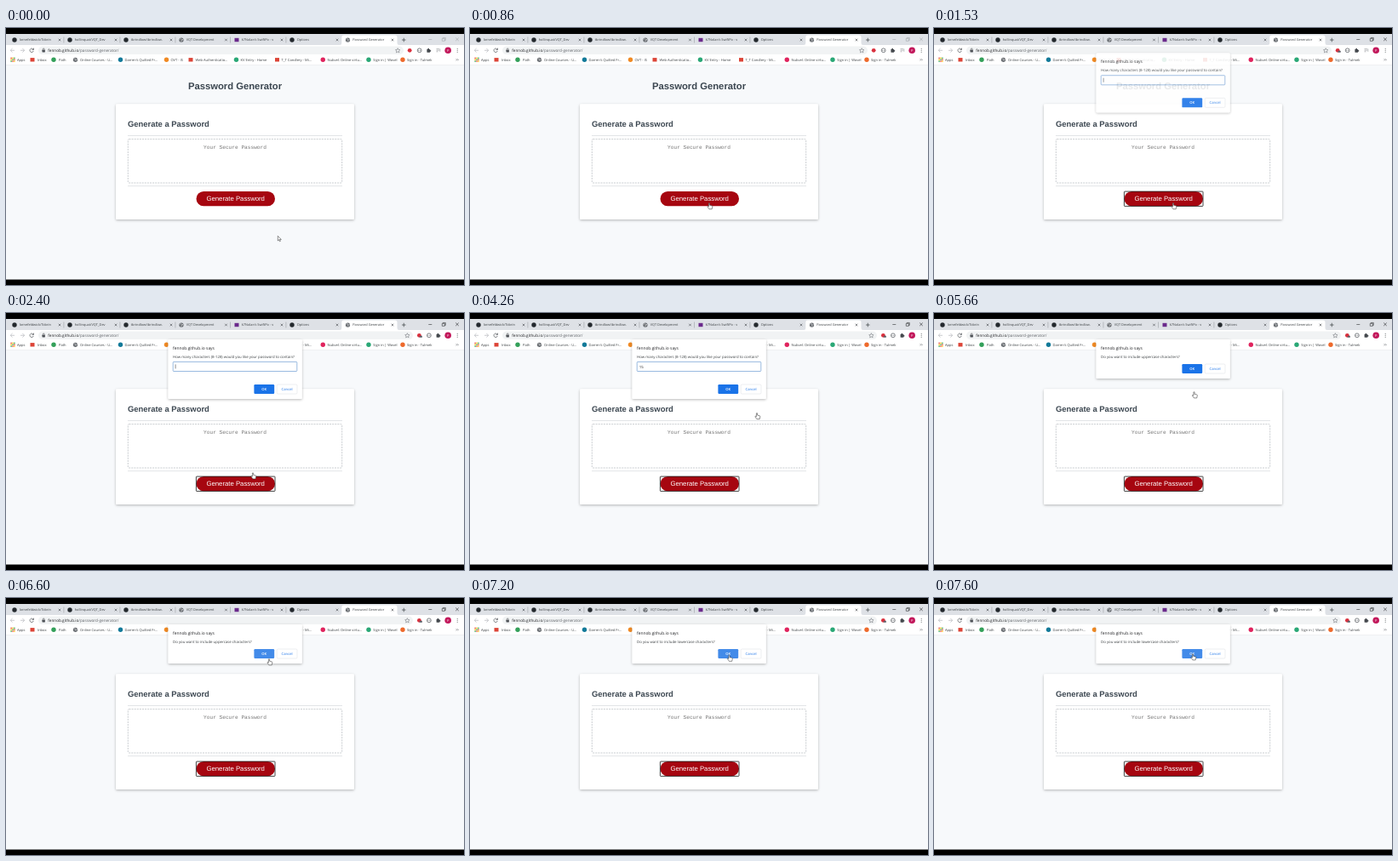
Animation of 538x302 px, one loop 8000 ms. Source, as an HTML page:

```html
<!DOCTYPE html>
<html lang="en">
<head>
<meta charset="utf-8">
<title>Password Generator</title>
<style>
html, body { margin: 0; width: 100%; height: 100%; overflow: hidden; background: #000; }
svg { display: block; width: 538px; height: 302px; }
text { font-family: "Open Sans", "Noto Sans", sans-serif; text-rendering: geometricPrecision; white-space: pre; }
.page { font-family: "Liberation Sans", Arial, sans-serif; }
.mono { font-family: "Liberation Mono", monospace; }
</style>
</head>
<body>
<svg id="stage" viewBox="0 0 538 302" xmlns="http://www.w3.org/2000/svg">
  <defs>
    <filter id="soft" x="-10%" y="-20%" width="120%" height="150%">
      <feDropShadow dx="0" dy="1" stdDeviation="1.5" flood-color="#000" flood-opacity=".28"/>
    </filter>
  </defs>
</svg>
<script>
const LOOP = 8000;
const stage = document.getElementById('stage');

function el(parent, tag, attrs, content) {
  const node = document.createElementNS('http://www.w3.org/2000/svg', tag);
  for (const key in attrs) node.setAttribute(key, attrs[key]);
  if (content !== undefined) node.textContent = content;
  parent.appendChild(node);
  return node;
}
const group = (p = stage) => el(p, 'g', {});
const rect = (p, x, y, width, height, fill, more) => el(p, 'rect', { x, y, width, height, fill, ...more });
const dot = (p, cx, cy, r, fill, more) => el(p, 'circle', { cx, cy, r, fill, ...more });
const line = (p, d, stroke, width = 0.6, more) =>
  el(p, 'path', { d, stroke, 'stroke-width': width, fill: 'none', ...more });
const text = (p, x, cy, size, str, fill, more) =>
  el(p, 'text', { x, y: cy + size * 0.35, 'font-size': size, fill, ...more }, str);
const cross = (p, x, y, r, color, w) =>
  line(p, `M${x - r} ${y - r}l${2 * r} ${2 * r}m0 ${-2 * r}l${-2 * r} ${2 * r}`, color, w);
const move = (node, x, y) => node.setAttribute('transform', `translate(${x} ${y})`);
const show = (node, on) => node.setAttribute('visibility', on ? 'inherit' : 'hidden');

function globe(p, x, y) {
  dot(p, x, y, 2.6, '#5f6368');
  line(p, `M${x - 1.8} ${y - 0.6}q1.6 -1.6 2.4 .2t1.2 -.8M${x - 1} ${y + 1.4}l1.2 -.8l.8 .8`, '#fff', 0.6);
}
function icon(p, kind, x, y) {
  if (kind === 'globe') return globe(p, x, y);
  if (kind === 'apps') {
    const hues = ['#ea4335', '#fbbc04', '#34a853'];
    for (let i = 0; i < 9; i++)
      rect(p, x - 2.6 + (i % 3) * 1.9, y - 2.6 + Math.floor(i / 3) * 1.9, 1.4, 1.4, hues[(i + Math.floor(i / 3)) % 3]);
    return;
  }
  if (kind[0] === '=') return rect(p, x - 2.5, y - 2.2, 5, 4.4, kind.slice(1));
  dot(p, x, y, 2.7, kind);
}

// Window
rect(stage, 0, 7, 538, 13, '#dee1e6');
rect(stage, 0, 20, 538, 24, '#fff');
rect(stage, 0, 43.2, 538, 0.6, '#dfe2e6');
rect(stage, 0, 43.8, 538, 252, '#f7f9fb');

// Tabs
el(stage, 'path', { d: 'M392 20q2.3 0 2.3 -2.5V11q0 -2.5 2.5 -2.5H457q2.5 0 2.5 2.5V17.5q0 2.5 2.3 2.5z', fill: '#fff' });
const tabs = [
  [10, '#24292e', 'lornefeldwick/Tobrin', 63],
  [75, '#24292e', 'hollinquat/VQT_Dev', 129],
  [141, '#24292e', 'tbrindlow/tbrindlow.', 194],
  [206, 'globe', 'VQT Development', 258.5],
  [271, '=#6b2a8c', "k7Nolan's SwiftPo - v", 324],
  [336, '#24292e', 'Options', 389],
  [401.5, 'globe', 'Password Generator', 454]
];
tabs.forEach(([x, kind, label, close], i) => {
  icon(stage, kind, x, 14);
  text(stage, x + 5.7, 14, 3.9, label, '#3c4043');
  cross(stage, close, 14, 1.3, '#45494d', 0.6);
  if (i < 5) rect(stage, close + 4.7, 10.5, 0.5, 7, '#8f9398');
});
line(stage, 'M465 14h4.6M467.3 11.7v4.6', '#3c4043', 0.7);
const controls = group();
line(controls, 'M496.3 13.5h4M512.3 12.3h3v3h-3zM513.3 12.3v-.9h3v3h-1', 'currentColor', 0.55);
cross(controls, 530, 13.3, 1.8, 'currentColor', 0.6);

// Address bar
line(stage, 'M10 26.3H5.4M7.5 24l-2.3 2.3l2.3 2.3M17 26.3h4.6M19.4 24l2.3 2.3l-2.3 2.3', '#b4b7bb', 0.7);
line(stage, 'M32.1 25.2a2.2 2.2 0 1 0 .2 1.8M32.5 23.6v2h-2', '#505458', 0.7);
const pill = rect(stage, 38, 21.5, 429, 9.6, '#f1f3f4', { rx: 4.8 });
rect(stage, 42.5, 25.8, 3.4, 2.7, '#4d5156', { rx: 0.4 });
line(stage, 'M43.2 26v-1a1 1 0 0 1 2 0v1', '#4d5156', 0.6);
text(stage, 49.3, 26.4, 4.66, 'fennob.github.io', '#202124').append(
  Object.assign(el(document.createElementNS('http://www.w3.org/2000/svg', 'g'), 'tspan', { fill: '#5f6368' }, '/password-generator/')));

// Toolbar icons, shifting right once the list icon is gone
const tools = group();
line(tools, 'M460.2 23.7l.8 1.8l1.9 .2l-1.4 1.3l.4 1.9l-1.7 -1l-1.7 1l.4 -1.9l-1.4 -1.3l1.9 -.2z', '#5f6368', 0.5);
dot(tools, 474.2, 26.3, 2.4, '#d9303e');
const badge = rect(tools, 474.7, 26.8, 3, 2, '#5b6068', { rx: 0.4 });
dot(tools, 485.7, 26.3, 2.4, 'none', { stroke: '#4d5156', 'stroke-width': 0.7 });
for (const x of [484.7, 486.7]) dot(tools, x, 26.3, 0.5, '#4d5156');
rect(tools, 494.4, 25, 3.8, 3.7, '#45494e', { rx: 0.4 });
dot(tools, 496.2, 24.7, 0.9, '#45494e');
dot(tools, 498.4, 26.8, 0.9, '#45494e');
const list = line(stage, 'M505.5 24.6h3.4M505.5 26.2h3.4M505.5 27.8h2M509.8 24.4v3.4', '#8b8f94', 0.6);
dot(stage, 519.2, 26.3, 3.8, '#c2185b');
text(stage, 519.2, 26.3, 3.8, 'P', '#fff', { 'text-anchor': 'middle' });
for (const y of [24.4, 26.3, 28.2]) dot(stage, 530.2, y, 0.5, '#4d5156');

// Bookmarks
[
  [8, 'apps', 13, 'Apps'],
  [31, '=#dc4437', 37, 'Inbox'],
  [56, '#34a05a', 62, 'Path'],
  [81.5, 'globe', 87, 'Online Courses - U...'],
  [134.5, '#137a99', 139.5, "Darren's Quilted Fr..."],
  [188.5, '#f08a24', 193.5, 'OVT - IS'],
  [217, '=#dc4437', 222.5, 'Web Authenticatio...'],
  [270.5, '#2aa876', 275.5, 'KV Entry - Home'],
  [318.5, '=#dc4437', 323.5, 'T_T Candlery - Mi...'],
  [372.3, '#e0245e', 377.5, 'Nubvel: Online virtu...'],
  [426, '#2aa876', 431.3, 'Sign in | Wovel'],
  [466, '#ee6a2c', 471, 'Sign in · Tulmek']
].forEach(([x, kind, tx, label]) => {
  icon(stage, kind, x, 37.3);
  text(stage, tx, 37.3, 4.05, label, '#3c4043');
});
line(stage, 'M528.7 36.2l1 1.1l-1 1.1M530.4 36.2l1 1.1l-1 1.1', '#45494e', 0.5);

// Page
const ink = '#3b4650';
const mid = { 'text-anchor': 'middle' };
text(stage, 269, 68.2, 11.25, 'Password Generator', ink, { ...mid, class: 'page', 'font-weight': 700 });
rect(stage, 129, 89.3, 280, 135.7, '#fff', { rx: 1.6, filter: 'url(#soft)' });
text(stage, 143, 112.8, 9.44, 'Generate a Password', ink, { class: 'page', 'font-weight': 700 });
for (const y of [126.2, 185.5]) rect(stage, 143, y, 252, 0.6, '#cfd3d7');
rect(stage, 143.3, 130.6, 251.4, 51.4, '#fff', { rx: 1.2, stroke: '#b3b8bd', 'stroke-width': 0.7, 'stroke-dasharray': '2 1.1' });
text(stage, 269, 140.3, 6.17, 'Your Secure Password', '#757575', { ...mid, class: 'mono' });
rect(stage, 223.5, 192, 92.5, 17.3, '#a60610', { rx: 8.65 });
text(stage, 269.7, 200.6, 7.75, 'Generate Password', '#fff', { ...mid, class: 'page' });
const focus = rect(stage, 223.4, 192.1, 92.6, 17.3, 'none', { stroke: '#151515', 'stroke-width': 0.8, rx: 0.6 });

// Dialogs
function makeDialog(message, prompt) {
  const g = group();
  const bottom = prompt ? 101 : 77;
  rect(g, 190.5, 31, 157.3, bottom - 31, '#fff', { rx: 1.5, filter: 'url(#soft)' });
  text(g, 196, 41.3, 4.9, 'fennob.github.io says', '#202124');
  text(g, 196, 51.3, 4.33, message, '#3c4043');
  const d = { g };
  if (prompt) {
    rect(g, 196.2, 57.4, 145.6, 11.1, '#fff', { rx: 0.8, stroke: '#7fa9d8', 'stroke-width': 0.8 });
    d.value = text(g, 198.7, 63, 4.33, '', '#202124');
    d.caret = rect(g, 198.8, 60.4, 0.5, 5, '#202124');
  }
  const y = bottom - 17;
  d.ok = rect(g, 291.4, y, 23.8, 11, '#1a73e8', { rx: 1.2 });
  text(g, 303.3, y + 5.5, 4.2, 'OK', '#fff', { ...mid, 'font-weight': 600 });
  rect(g, 318.2, y, 23.8, 11, '#fff', { rx: 1.2, stroke: '#dadce0', 'stroke-width': 0.5 });
  text(g, 330.1, y + 5.5, 4.2, 'Cancel', '#1a73e8', { ...mid, 'font-weight': 500 });
  d.y = y;
  return d;
}
const dialogs = [
  { ...makeDialog('How many characters (8-128) would you like your password to contain?', true), open: 1400, close: 5200 },
  { ...makeDialog('Do you want to include uppercase characters?'), open: 5400, close: 6800 },
  { ...makeDialog('Do you want to include lowercase characters?'), open: 6930, close: 9000 }
];
const prompt = dialogs[0];

rect(stage, 0, 0, 538, 7, '#000');
rect(stage, 0, 295.7, 538, 6.3, '#000');

// Pointers, with the hot spot at 0,0
const arrow = el(stage, 'path', {
  d: 'M0 0V5.6L1.3 4.4L2.2 6.4L3.1 6L2.2 4.1H4z', fill: '#fff', stroke: '#222', 'stroke-width': 0.5
});
const hand = el(stage, 'path', {
  d: 'M-.6 .4Q0 -.4 .6 .4V2.7L3.2 3.3Q4 3.6 3.8 4.5L3.2 7.3H-.1L-2.1 4.5Q-2.1 3.6 -1.3 3.9L-.6 4.5z',
  fill: '#fff', stroke: '#222', 'stroke-width': 0.5, 'stroke-linejoin': 'round'
});

const path = [
  [60, 319.3, 244.4], [860, 281, 205.5], [2000, 281, 205.5], [2400, 290, 187.6],
  [4000, 290, 187.6], [4260, 337, 117.4], [4660, 312, 96], [4800, 312, 96],
  [5060, 305.5, 92.6], [6330, 305.5, 92.6], [6600, 309, 71.5], [6760, 304.5, 67],
  [7200, 304.5, 67], [7600, 304, 65.6]
];
const carets = [[1400, 2000], [2400, 2860], [3400, 4000], [4530, 5200]];
const clamp = v => Math.min(1, Math.max(0, v));
const easeOut = v => 1 - (1 - v) ** 2;

function pointerAt(t) {
  let i = 0;
  while (i < path.length - 2 && t >= path[i + 1][0]) i++;
  const [t0, x0, y0] = path[i], [t1, x1, y1] = path[i + 1];
  const k = clamp((t - t0) / (t1 - t0));
  const e = k * k * (3 - 2 * k);
  return [x0 + (x1 - x0) * e, y0 + (y1 - y0) * e];
}

function draw(t) {
  const [x, y] = pointerAt(t);
  const onButton = y < 209;
  show(arrow, !onButton);
  show(hand, onButton);
  move(arrow, x, y);
  move(hand, x, y);

  const active = t >= 1130;
  show(focus, active);
  show(badge, active);
  controls.setAttribute('color', active ? '#202124' : '#a0a4a9');

  const shifted = t >= 1800;
  move(tools, shifted ? 11.2 : 0, 0);
  show(list, !shifted);
  pill.setAttribute('width', shifted ? 440 : 429);

  for (const d of dialogs) {
    const shown = easeOut(clamp((t - d.open) / 200));
    const alpha = shown * (1 - clamp((t - d.close) / 130));
    show(d.g, alpha > 0);
    d.g.setAttribute('opacity', alpha);
    move(d.g, 0, -14 * (1 - shown));
    const hover = d !== prompt && x > 291 && x < 315 && y > d.y && y < d.y + 11.6;
    d.ok.setAttribute('fill', hover ? '#438be9' : '#1a73e8');
  }

  const typed = t < 3400 ? '' : t < 3460 ? '1' : '15';
  prompt.value.textContent = typed;
  prompt.caret.setAttribute('x', 198.8 + typed.length * 2.48);
  show(prompt.caret, carets.some(([a, b]) => t >= a && t < b));
}

const start = performance.now();
function tick() {
  draw((performance.now() - start) % LOOP);
  requestAnimationFrame(tick);
}
tick();
</script>
</body>
</html>
```
